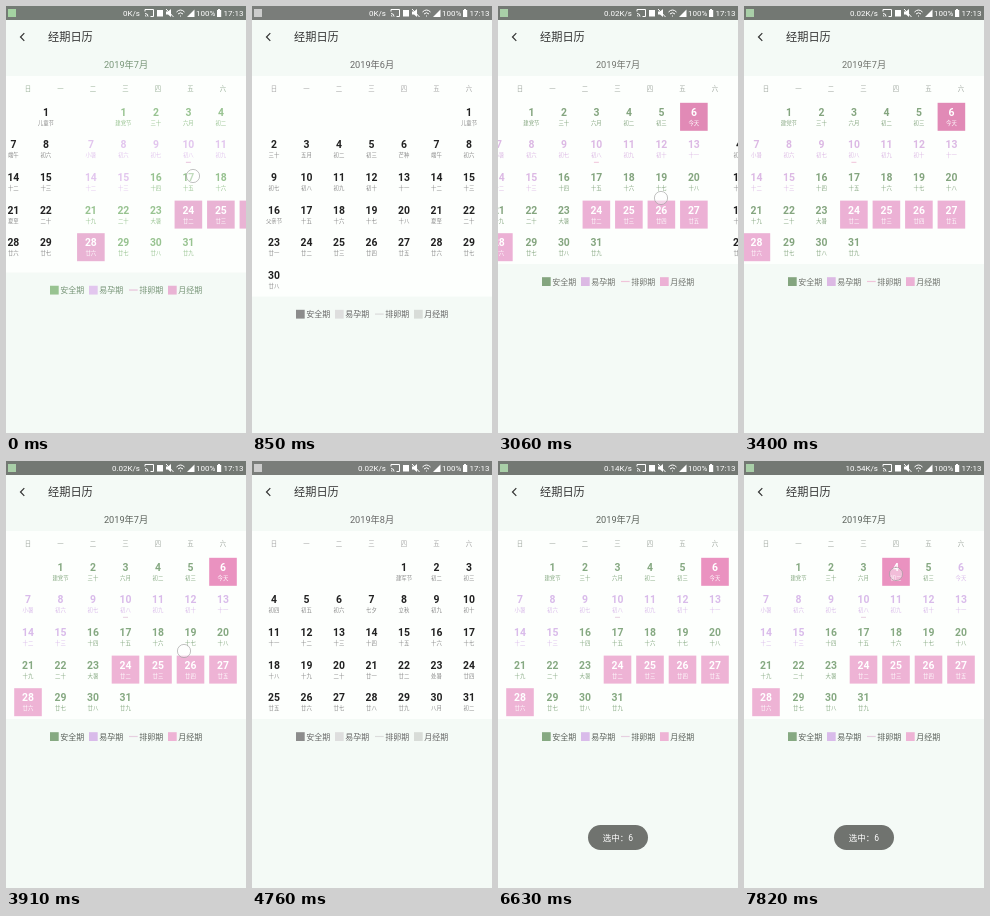
An HTML page for the animation above (7.99 s loop, 240x427 px).

```html
<!DOCTYPE html>
<html lang="zh-CN">
<head>
<meta charset="utf-8">
<title>经期日历</title>
<style>
html, body { margin: 0; width: 100%; height: 100%; overflow: hidden; background: #f4faf6; }
svg { display: block; width: 100%; height: 100%; font-family: Roboto, "Noto Sans CJK SC", "Noto Sans CJK", sans-serif; }
.mid { text-anchor: middle; }
.num { font-size: 10.4px; font-weight: 700; }
.sub { font-size: 5.4px; }
.status { font-size: 8px; fill: #fff; }
.icon { fill: none; stroke: #fff; stroke-width: 1; }
.plain { fill: #222; }
.plain .sub { fill: #888; }
.safe { fill: var(--safe); }
.fertile { fill: var(--fertile); }
.period { fill: var(--period); }
.picked { fill: var(--picked); }
.onBox { fill: #fff; }
</style>
</head>
<body>
<svg id="stage" viewBox="0 0 240 427" preserveAspectRatio="none"></svg>
<script>
const LOOP = 7990, STEP = 170, PAGE = 240;
const COL = 32.5, ROW = 32.6;
const stage = document.getElementById('stage');

function add(parent, tag, attrs = {}, text) {
  const node = document.createElementNS('http://www.w3.org/2000/svg', tag);
  for (const key in attrs) node.setAttribute(key, attrs[key]);
  if (text !== undefined) node.textContent = text;
  parent.append(node);
  return node;
}
const label = (parent, x, y, text, attrs) => add(parent, 'text', { x, y, ...attrs }, text);
const box = (parent, x, y, width, height, attrs) => add(parent, 'rect', { x, y, width, height, ...attrs });

// Tables of steps: [time, value]
const scroll = [ // 0 = June, 1 = July, 2 = August
  [0, .738], [170, .34], [340, .06], [510, 0], [1870, 0], [2040, .03], [2210, .354],
  [2380, .83], [2550, .98], [2720, 1], [2890, 1], [3060, 1.088], [3230, 1.16], [3400, 1.04], [3570, 1],
  [3910, 1], [4080, 1.32], [4250, 1.8], [4420, 1.97], [4590, 2],
  [4930, 2], [5100, 1.75], [5270, 1.25], [5440, 1.04], [5610, 1], [LOOP, 1]
];
const touches = [ // each a path of [time, x, y]
  [[0, 187, 170], [170, 226, 166]],
  [[1870, 190, 216], [2040, 178, 218], [2210, 98, 224]],
  [[2890, 188, 190], [3060, 163, 192], [3230, 148, 192]],
  [[3740, 183, 190], [3910, 178, 190], [4080, 104, 196], [4250, 50, 200]],
  [[4930, 76, 196], [5100, 132, 192], [5270, 204, 188]],
  [[6290, 217, 113], [6460, 217, 113]],
  [[7480, 152, 113], [7820, 152, 113]]
];
const toastFade = [[0, 0], [6290, 0], [6460, .5], [6630, 1], [LOOP, 1]];
const speeds = [[0, '0K/s'], [2040, '0.02K/s'], [4930, '0.14K/s'], [7480, '10.54K/s']];
const months = [[0, 7], [170, 6], [2380, 7], [4250, 8], [5270, 7]];
const shades = ['safe', 'fertile', 'ovum', 'period', 'picked', 'bar', 'ink', 'weak', 'badge'];
const green = '#86a982 #d9bbea #e6cfe0 #eeb3d5 #ea92c0 #737873 #5c625c #a3aaa3 #a9cfa8'.split(' ');
const gray = '#8c8c8c #dedede #dcdcdc #d8dcd8 #d0d0d0 #7a7d7a #666666 #a6a6a6 #cccccc'.split(' ');
const palettes = [
  [0, '#98c391 #e2c6ee #e8c3dc #e9b3d4 #e38fbb #747b75 #789578 #9db39c #a4d3a2'.split(' ')],
  [340, gray],
  [2040, '#8a8a8a #e6b8d5 #eac4da #e6b6d3 #e08ab5 #787878 #6a6a6a #a6a6a6 #cccccc'.split(' ')],
  [2550, '#84a57f #dcb9e4 #f0c4da #ecb1d5 #e18ab6 #737873 #6f726c #a3aaa3 #a9cfa8'.split(' ')],
  [3740, green],
  [4420, gray],
  [5100, green]
];

const latest = (table, t) => table.filter(row => row[0] <= t).pop()[1];
function between(table, t, i = 1) {
  const n = table.findIndex(row => row[0] >= t);
  if (n < 1) return table[n < 0 ? table.length - 1 : 0][i];
  const a = table[n - 1], b = table[n];
  return a[i] + (b[i] - a[i]) * (t - a[0]) / (b[0] - a[0]);
}

function lunarName(day) {
  if (day === 20) return '二十';
  if (day === 30) return '三十';
  return '初十廿'[Math.floor((day - 1) / 10)] + '一二三四五六七八九十'[(day - 1) % 10];
}

function july(day) {
  if (day >= 24 && day <= 28) return 'period';
  return day >= 6 && day <= 15 ? 'fertile' : 'safe';
}

const selectable = {};
function buildMonth(parent, { first, days, shift, names, kind }) {
  const page = add(parent, 'g');
  for (let day = 1; day <= days; day++) {
    const slot = first + day - 1;
    const x = 22 + slot % 7 * COL, y = 106 + Math.floor(slot / 7) * ROW;
    const type = kind ? kind(day) : 'plain';
    const cell = add(page, 'g', { class: type === 'period' ? 'onBox' : type });
    if (type === 'period') box(cell, x - 13.8, y - 9.2, 27.6, 28, { class: 'period' });
    if (kind && (day === 4 || day === 6)) {
      const back = box(cell, x - 13.8, y - 9.2, 27.6, 28, { class: 'picked' });
      selectable[day] = { cell, back, type };
    }
    label(cell, x, y + 3.8, day, { class: 'mid num' });
    label(cell, x, y + 12.8, names[day] || lunarName((day + shift + 29) % 30 + 1), { class: 'mid sub' });
    if (kind && day === 10) box(cell, x - 2.5, y + 17.2, 5, 1, { fill: 'var(--ovum)' });
  }
  return page;
}

// Static screen parts
box(stage, 0, 0, 240, 427, { fill: '#f4faf6' });
const sheet = box(stage, 0, 70, 240, 188, { fill: '#fdfffd' });
box(stage, 0, 0, 240, 14, { fill: 'var(--bar)' });
box(stage, 2, 3, 8, 8, { fill: 'var(--badge)' });
const speed = label(stage, 134, 10, '', { class: 'status', 'text-anchor': 'end' });
add(stage, 'path', { class: 'icon', d: 'M139 5.5V3.5H147.5V10.5H144.5M139 7.5a3 3 0 0 1 3 3M139 9.5a1 1 0 0 1 1 1' });
box(stage, 151, 4, 6, 6.5, { fill: '#fff' });
add(stage, 'path', { fill: '#fff', d: 'M160 5.5h2l3-2.5v8l-3-2.5h-2z' });
add(stage, 'path', { class: 'icon', d: 'M160 3l7.5 8' });
add(stage, 'path', { class: 'icon', d: 'M170.5 6q4-4 8 0M172 8q2.5-2.5 5 0M174 10h1' });
add(stage, 'path', { fill: '#fff', d: 'M181 11h7.5V3.5z' });
label(stage, 190, 10, '100%', { class: 'status' });
add(stage, 'path', { fill: '#fff', d: 'M211 4h1V3h2v1h1.2v7H211z' });
label(stage, 217.5, 10, '17:13', { class: 'status' });
add(stage, 'path', { d: 'M18.3 27.2l-3.8 3.8 3.8 3.8', fill: 'none', stroke: '#333', 'stroke-width': 1.2 });
label(stage, 42, 35, '经期日历', { 'font-size': 11.2, fill: '#333' });
const heading = label(stage, 120, 62.4, '', { class: 'mid', 'font-size': 9.2, fill: 'var(--ink)' });
[...'日一二三四五六'].forEach((name, i) =>
  label(stage, 22 + i * COL, 85.4, name, { class: 'mid', 'font-size': 6.4, fill: 'var(--weak)' }));

const pages = [
  { first: 6, days: 30, shift: -2, names: { 1: '儿童节', 3: '五月', 6: '芒种', 7: '端午', 16: '父亲节', 21: '夏至' } },
  { first: 1, days: 31, shift: -2, kind: july, names: { 1: '建党节', 3: '六月', 6: '今天', 7: '小暑', 23: '大暑' } },
  { first: 4, days: 31, shift: 0, names: { 1: '建军节', 7: '七夕', 8: '立秋', 23: '处暑', 30: '八月', 31: '初二' } }
].map(month => buildMonth(stage, month));

const legend = add(stage, 'g');
[['安全期', 44, 'safe'], ['易孕期', 83, 'fertile'], ['排卵期', 123, 'ovum'], ['月经期', 162, 'period']].forEach(([name, x, shade]) => {
  const thin = shade === 'ovum';
  box(legend, x, thin ? -.7 : -4.4, 8.7, thin ? 1.2 : 8.8, { fill: `var(--${shade})` });
  label(legend, x + 10.3, 3, name, { 'font-size': 8, fill: 'var(--ink)' });
});

const toast = add(stage, 'g');
box(toast, 90, 364, 60, 25, { rx: 12.5, fill: '#70736f' });
label(toast, 120, 379.6, '选中：6', { class: 'mid', 'font-size': 8.5, fill: '#fff' });
const finger = add(stage, 'circle', { r: 6.6, fill: '#fff', 'fill-opacity': .4, stroke: '#999', 'stroke-opacity': .6 });

function draw(t) {
  latest(palettes, t).forEach((color, i) => stage.style.setProperty('--' + shades[i], color));
  speed.textContent = latest(speeds, t);
  heading.textContent = `2019年${latest(months, t)}月`;

  const pos = between(scroll, t);
  pages.forEach((page, i) => page.setAttribute('transform', `translate(${(i - pos) * PAGE} 0)`));
  const extra = ROW * Math.max(0, 1 - pos);
  sheet.setAttribute('height', 188 + extra);
  legend.setAttribute('transform', `translate(0 ${275.6 + extra})`);

  const chosen = t < 7480 ? 6 : 4;
  for (const day in selectable) {
    const { cell, back, type } = selectable[day], on = +day === chosen;
    cell.setAttribute('class', on ? 'onBox' : type);
    back.setAttribute('visibility', on ? 'visible' : 'hidden');
  }

  const path = touches.find(p => t >= p[0][0] && t <= p[p.length - 1][0]);
  finger.setAttribute('visibility', path ? 'visible' : 'hidden');
  if (path) {
    finger.setAttribute('cx', between(path, t, 1));
    finger.setAttribute('cy', between(path, t, 2));
  }
  toast.setAttribute('opacity', between(toastFade, t));
}

let start;
function tick(now) {
  start ??= now;
  const t = Math.max(0, now - start) % LOOP;
  draw(Math.floor(t / STEP) * STEP);
  requestAnimationFrame(tick);
}
draw(0);
requestAnimationFrame(tick);
</script>
</body>
</html>
```
